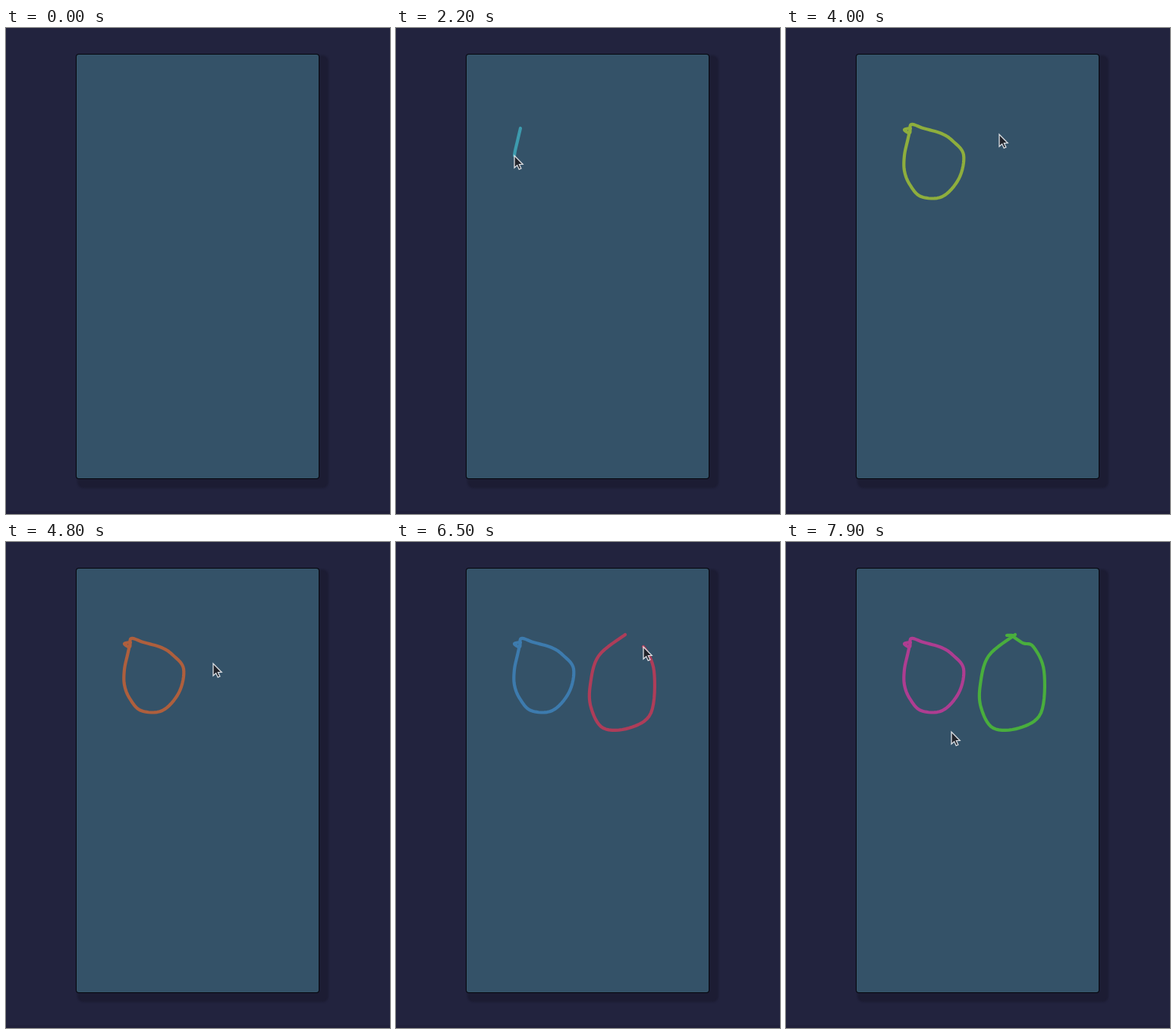
These frames come from a looping animation (506 by 640 pixels, 8000 ms). An HTML page with a canvas:

```html
<!DOCTYPE html>
<html lang="en">
<head>
<meta charset="utf-8">
<title>Drawing with shifting colours</title>
<style>
  html, body { margin: 0; width: 100%; height: 100%; overflow: hidden; background: #22233e; }
  canvas { display: block; }
</style>
</head>
<body>
<canvas id="stage" width="506" height="640"></canvas>
<script>
const ctx = document.getElementById('stage').getContext('2d');
const LOOP = 8000, STEP = 100;

const mix = (a, b, k) => a + (b - a) * k;

// Linear interpolation through rows of [time, ...values].
function sample(keys, t) {
  const i = keys.findIndex(key => key[0] > t);
  if (i < 0) return keys[keys.length - 1].slice(1);
  if (i === 0) return keys[0].slice(1);
  const [ta, ...a] = keys[i - 1], [tb, ...b] = keys[i];
  return a.map((v, n) => mix(v, b[n], (t - ta) / (tb - ta)));
}

// Catmull-Rom curve; u counts key points.
function curve(points, u) {
  const last = points.length - 1;
  const i = Math.min(Math.floor(u), last - 1), k = u - i;
  const at = n => points[Math.max(0, Math.min(last, n))];
  const [a, b, c, d] = [at(i - 1), at(i), at(i + 1), at(i + 2)];
  return [0, 1].map(n => b[n] + k / 2 * (c[n] - a[n]
    + k * (2 * a[n] - 5 * b[n] + 4 * c[n] - d[n]
    + k * (3 * (b[n] - c[n]) + d[n] - a[n]))));
}

// Strokes pass one key point per step.
const strokes = [
  {
    start: 2000,
    points: [
      [164,132], [160,149], [156,168], [156,188], [163,206], [178,222], [206,222],
      [228,198], [234,167], [220,149], [205,139], [181,132], [165,127], [163,138],
      [156,134], [163,132]
    ],
    hue: t => sample([[3000,190], [4000,77], [4800,18], [6500,207], [7900,315]], t)[0]
  },
  {
    start: 5700,
    points: [
      [302,122], [267,150], [256,188], [257,218], [273,245], [307,245], [336,225],
      [340,170], [326,138], [312,133], [298,124], [291,123], [301,123]
    ],
    hue: t => 345 + (t - 6500) * 0.092
  }
];
for (const s of strokes) s.end = s.start + (s.points.length - 1) * STEP;

// Pointer stops between strokes, joined to the stroke ends.
const travel = [
  [100,457,500], [500,310,492], [700,310,492], [1000,201,310], [1300,239,173],
  [1400,239,173], [1700,172,114], [4000,281,140], [4800,273,160], [5300,342,135],
  [7400,240,250], [7900,218,250],
  ...strokes.flatMap(s => [[s.start, ...s.points[0]], [s.end, ...s.points.at(-1)]])
].sort((a, b) => a[0] - b[0]);

function pointerAt(t) {
  const s = strokes.find(s => t >= s.start && t <= s.end);
  return s ? curve(s.points, (t - s.start) / STEP) : sample(travel, t);
}

function box(x, y, w, h, r, fill) {
  ctx.fillStyle = fill;
  ctx.beginPath();
  ctx.roundRect(x, y, w, h, r);
  ctx.fill();
}

function drawScene() {
  ctx.fillStyle = '#22233e';
  ctx.fillRect(0, 0, 506, 640);
  ctx.fillStyle = '#20203a';
  ctx.fillRect(0, 636, 506, 4);
  ctx.filter = 'blur(1px)';
  box(94, 36, 331, 570, 8, '#1c1c33');
  ctx.filter = 'none';
  box(92, 34, 321, 560, 4, '#05060c');
  box(93, 35, 319, 558, 3, '#345268');
}

function drawStroke(s, t) {
  if (t <= s.start) return;
  const end = (Math.min(t, s.end) - s.start) / STEP;
  ctx.beginPath();
  for (let u = 0; u <= end; u += 0.125) ctx.lineTo(...curve(s.points, u));
  ctx.lineWidth = 4.2;
  ctx.lineCap = ctx.lineJoin = 'round';
  ctx.strokeStyle = `hsl(${s.hue(t)}, 48%, 46%)`;
  ctx.stroke();
}

const arrow = new Path2D('M0 0V16L3.7 12.8L6.2 18.2L8.9 17L6.4 11.7L11.2 11.5Z');

function drawPointer(x, y) {
  ctx.save();
  ctx.translate(x, y);
  ctx.fillStyle = '#22242b';
  ctx.fill(arrow);
  ctx.lineWidth = 1.3;
  ctx.lineJoin = 'miter';
  ctx.strokeStyle = '#dcdfe3';
  ctx.stroke(arrow);
  ctx.restore();
}

function frame() {
  const t = Math.floor((performance.now() % LOOP) / STEP) * STEP;
  drawScene();
  strokes.forEach(s => drawStroke(s, t));
  if (t >= travel[0][0]) drawPointer(...pointerAt(t));
  requestAnimationFrame(frame);
}
frame();
</script>
</body>
</html>
```
